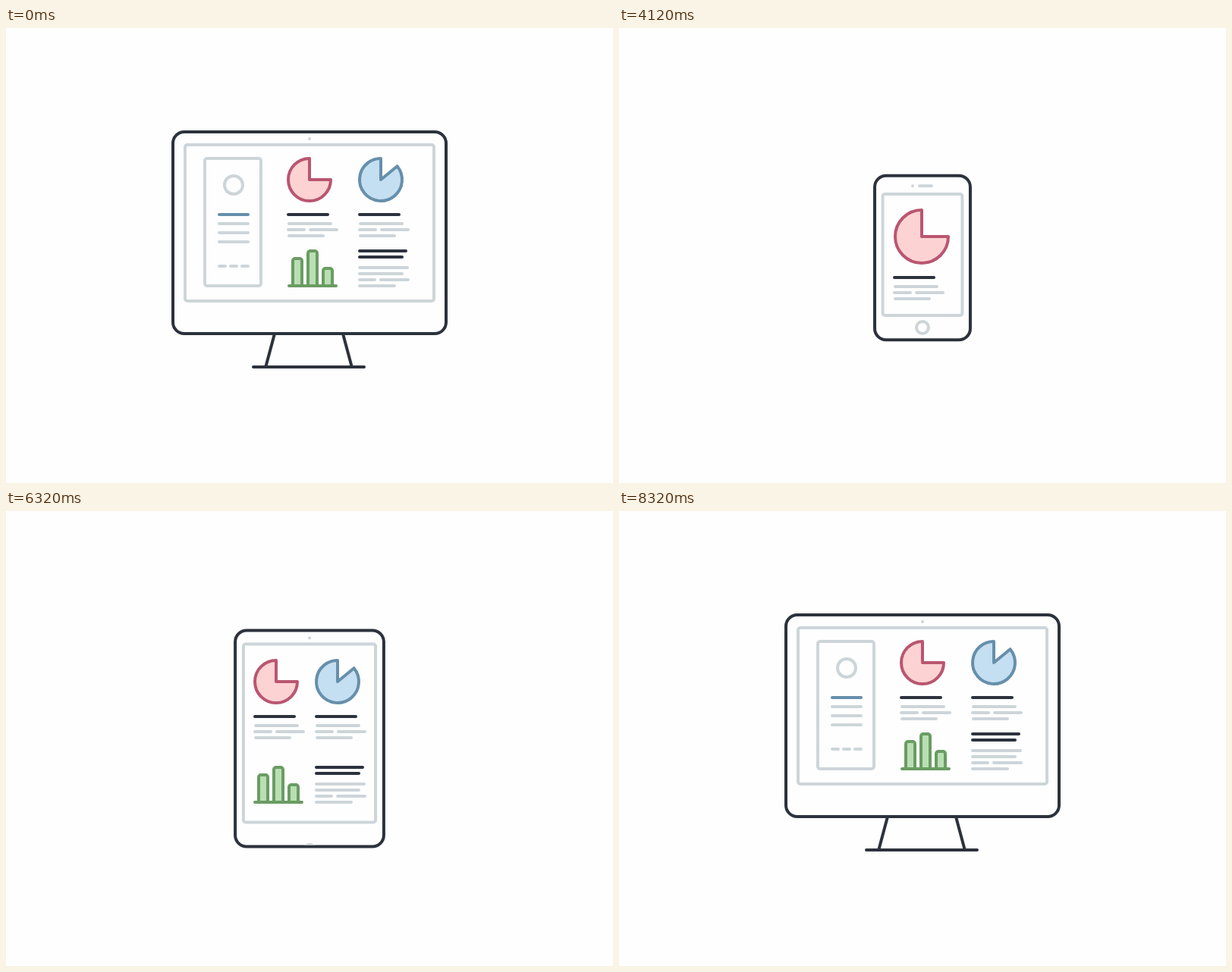
An HTML page with a canvas that plays this animation: 800 by 600 pixels, repeating every 9240 ms.

```html
<!DOCTYPE html>
<html lang="en">
<head>
<meta charset="utf-8">
<title>Responsive dashboard</title>
<style>
html, body { margin: 0; width: 100%; height: 100%; overflow: hidden; background: #fefefe; }
canvas { display: block; width: 800px; height: 600px; }
</style>
</head>
<body>
<canvas id="stage" width="800" height="600"></canvas>
<script>
const ctx = document.getElementById('stage').getContext('2d');
const LOOP = 9240, STEP = 40, BLANK = 160;
const WHITE = '#fefefe', DARK = '#2c323d', GREY = '#cdd5d9';
const PINK = ['#b95670', '#fdd2d3'], BLUE = ['#668fab', '#c4dff1'], GREEN = ['#6a9c63', '#b9dfb3'];
const WATCH = 0, PHONE = 1, TABLET = 2, DESKTOP = 3;
const STARTS = [400, 2880, 4080, 6240];

// Rectangles are x, y, w, h; pies are cx, cy, r
const DEVICES = [
  { body: [349, 242, 100, 114], screen: [362, 260, 74, 80], pie: [400, 294, 18], head: [380, 324, 40] },
  { body: [336, 193, 128, 220], screen: [347, 218, 106, 162], pie: [399, 275, 35], head: [361, 329, 56],
    cam: [387, 13.5], home: [395] },
  { body: [299, 153, 202, 294], screen: [311, 173, 178, 240], pie: [356, 225, 28], head: [326, 271, 56],
    cam: [400, 10], home: [430], pie2: [437, 225, 28], text2: [407, 271], bars: [326, 384], text3: [407, 338] },
  { body: [220, 137, 360, 266], screen: [236, 154, 328, 206], pie: [400, 200, 28], head: [370, 246, 56],
    cam: [400, 9], pie2: [494, 200, 28], text2: [464, 246], bars: [371, 340], text3: [464, 294] }
];

// Text rows: x0, x1, y, dark
const DETAILS = [[1, 60, 12], [0, 25, 20], [29, 68, 20], [1, 50, 28]];
const SUMMARY = [[0, 56, 0, 1], ...DETAILS];
const ARTICLE = [[0, 65, 0, 1], [0, 60, 8, 1], [0, 67, 22], [0, 60, 30], [0, 24, 38], [28, 68, 38], [0, 50, 46]];
const BARS = [[7, 36], [27, 46], [47, 23]];

const clamp = v => Math.max(0, Math.min(1, v));
const ease = v => v < .5 ? 4 * v ** 3 : 1 - (2 - 2 * v) ** 3 / 2;
const quad = v => v < .5 ? 2 * v * v : 1 - 2 * (1 - v) ** 2;
const out = v => 1 - (1 - v) ** 3;
const ramp = (u, start, dur) => clamp((u - start) / dur);

function stroke(color, width = 4) {
  ctx.strokeStyle = color;
  ctx.lineWidth = width;
  ctx.stroke();
}

function dot(x, y, r, color) {
  if (r <= 0) return;
  ctx.beginPath();
  ctx.arc(x, y, r, 0, 7);
  ctx.fillStyle = color;
  ctx.fill();
}

function segment(x0, y0, x1, y1, color, p = 1) {
  if (p <= 0) return;
  ctx.beginPath();
  ctx.moveTo(x0, y0);
  ctx.lineTo(x0 + (x1 - x0) * p, y0 + (y1 - y0) * p);
  stroke(color);
}

const bar = (x0, x1, y, color, p = 1) => segment(x0 + 2, y, x1 - 2, y, color, p);

// Strokes the part of a rounded rectangle between a and b, clockwise from top centre
function frame([x, y, w, h], r, color, a = 0, b = 1) {
  if (b <= a) return;
  const cx = x + w / 2, length = 2 * (w + h) - (8 - 2 * Math.PI) * r;
  ctx.beginPath();
  ctx.moveTo(cx, y);
  ctx.arcTo(x + w, y, x + w, y + h, r);
  ctx.arcTo(x + w, y + h, x, y + h, r);
  ctx.arcTo(x, y + h, x, y, r);
  ctx.arcTo(x, y, cx, y, r);
  ctx.closePath();
  if (a > 0 || b < 1) {
    ctx.setLineDash([(b - a) * length, length * 2]);
    ctx.lineDashOffset = -a * length;
  }
  stroke(color);
  ctx.setLineDash([]);
}

// Draws a frame on, with a faded leading end
function drawOn(rect, r, color, progress, u) {
  const tail = progress(u - STEP), n = 6;
  frame(rect, r, color, 0, tail);
  ctx.lineCap = 'butt';
  for (let k = 0; k < n; k++) {
    ctx.globalAlpha = 1 - (k + .5) / n;
    frame(rect, r, color, progress(u - STEP + k * STEP / n), progress(u - STEP + (k + 1) * STEP / n));
  }
  ctx.globalAlpha = 1;
  ctx.lineCap = 'round';
}

function pie([x, y, r], from, [line, fill], p = 1) {
  if (p <= 0) return;
  ctx.beginPath();
  ctx.moveTo(x, y);
  ctx.arc(x, y, r * p, from, Math.PI * 1.5);
  ctx.closePath();
  ctx.fillStyle = fill;
  ctx.fill();
  stroke(line);
}

function text(rows, [x, y], p = 1) {
  rows.forEach(([x0, x1, dy, dark], i) =>
    bar(x + x0, x + x1, y + dy, dark ? DARK : GREY, ease(clamp((p * (rows.length + 2) - i) / 3))));
}

function chart([x, y], base, grow) {
  BARS.forEach(([dx, full], i) => {
    const h = full * out(clamp(grow * 1.6 - i * .3));
    if (h < 1) return;
    ctx.beginPath();
    ctx.moveTo(x + dx, y);
    ctx.arcTo(x + dx, y - h, x + dx + 6, y - h, Math.min(3, h));
    ctx.arcTo(x + dx + 12, y - h, x + dx + 12, y, Math.min(3, h));
    ctx.lineTo(x + dx + 12, y);
    ctx.fillStyle = GREEN[1];
    ctx.fill();
    stroke(GREEN[0]);
  });
  bar(x, x + 66, y, GREEN[0], base);
}

function ring(x, y, r, p = 1) {
  if (p <= 0) return;
  ctx.beginPath();
  ctx.arc(x, y, r, -Math.PI / 2, -Math.PI / 2 + p * 2 * Math.PI);
  stroke(GREY);
}

function scaled([x, y, w, h], s, grow = 0) {
  const dx = w * (1 - s) / 2 - grow, dy = h * (1 - s) / 2 - grow;
  return [x + dx, y + dy, w - 2 * dx, h - 2 * dy];
}

function crown(x) {
  if (x <= 449) return;
  ctx.fillStyle = WHITE;
  ctx.fillRect(446, 271, x - 446, 14);
  ctx.beginPath();
  ctx.moveTo(449, 270);
  ctx.arcTo(x, 270, x, 278, 2);
  ctx.arcTo(x, 286, 449, 286, 2);
  ctx.lineTo(449, 286);
  stroke(DARK);
}

function intro(u) {
  const fall = ramp(u, 0, 360);
  if (fall < 1) dot(400, 2 + 297 * fall * fall, 4, DARK);
  const burst = ramp(u, 360, 740);
  if (burst > 0 && burst < 1) {
    const colors = [PINK[0], BLUE[0], GREEN[0], GREY];
    for (let i = 0; i < 8; i++) {
      const a = i * Math.PI / 4, d = 148 * out(burst);
      dot(400 + d * Math.cos(a), 300 + d * Math.sin(a), 4 * (1 - burst), colors[i % 4]);
    }
  }
  const watch = DEVICES[WATCH], [x, y, w] = watch.head;
  drawOn(watch.body, 15, DARK, v => ease(ramp(v, 440, 540)), u);
  crown(449 + 4 * out(ramp(u, 980, 160)));
  frame(watch.screen, 3, GREY, 0, ease(ramp(u, 800, 480)));
  pie(watch.pie, 0, PINK, out(ramp(u, 1200, 400)));
  bar(x, x + w, y, DARK, ease(ramp(u, 1540, 340)));
}

function stand(u) {
  segment(444.5, 405, 455.5, 446, DARK, ramp(u, 520, 120));
  segment(472, 447, 326, 447, DARK, quad(ramp(u, 620, 160)));
  segment(342.5, 446, 353.5, 405, DARK, ramp(u, 800, 140));
}

function sidebar(u) {
  frame([262, 172, 74, 168], 3, GREY, 0, quad(ramp(u, 640, 410)));
  ring(300, 207, 12, ease(ramp(u, 1060, 300)));
  for (let i = 0; i < 4; i++)
    bar(279, 321, 246 + 12 * i, i ? GREY : BLUE[0], ease(ramp(u, 1280 + 110 * i, 220)));
  for (let i = 0; i < 3; i++)
    bar(279 + 15 * i, 291 + 15 * i, 314, GREY, ease(ramp(u, 1720 + 80 * i, 180)));
}

function morph(stage, u) {
  const from = DEVICES[stage - 1], to = DEVICES[stage];
  const k = ease(ramp(u, 160, 300));
  const squeeze = .052 * Math.sin(Math.PI / 2 * clamp(u / 200)) * (1 - k);
  const mix = key => {
    const b = to[key], a = from[key] || b;
    return b.map((v, i) => a[i] + (v - a[i]) * k);
  };
  const since = (device, start, dur) => stage > device ? 1 : stage < device ? 0 : ramp(u, start, dur);

  const settle = stage === DESKTOP
    ? Math.cos((u - 400) / 111) * ramp(u, 160, 240) * (1 - ramp(u, 400, 900)) : 0;
  const body = scaled(mix('body'), 1 - squeeze, settle);
  const screen = scaled(mix('screen'), 1 - squeeze * .7, settle);
  const bottom = body[1] + body[3];

  if (stage === DESKTOP) stand(u);
  frame(body, 15, DARK, ease(ramp(u, 120, 220)), u < 340 ? 1 : 0);
  drawOn(body, 15, DARK, v => ease(ramp(v, 294, 480)), u);
  if (stage === PHONE) crown(453 - 6 * ramp(u, 0, 120));
  frame(screen, 3, GREY);

  const [camX, camY] = mix('cam');
  dot(camX, body[1] + camY, 2 * since(PHONE, 480, 120), GREY);
  if (stage < DESKTOP) {
    const speaker = stage === PHONE ? ease(ramp(u, 560, 200)) : 1 - ramp(u, 120, 140);
    bar(394, 414, body[1] + camY, GREY, speaker);
    ring(400, mix('home')[0], 8, since(PHONE, 520, 260));
  } else if (u < 120) {
    ctx.save();
    ctx.beginPath();
    ctx.rect(body[0], body[1], body[2], body[3] - 2);
    ctx.clip();
    ring(400, Math.min(430 + 18 * u / 80, bottom + 12), 8);
    ctx.restore();
  }

  const [x, y, w] = mix('head');
  pie(mix('pie'), 0, PINK);
  bar(x, x + w, y, DARK);
  text(DETAILS, [x, y], since(PHONE, 620, 500));

  if (stage >= TABLET) {
    pie(mix('pie2'), -.69, BLUE, out(since(TABLET, 636, 360)));
    text(SUMMARY, mix('text2'), since(TABLET, 900, 560));
    chart(mix('bars'), ease(since(TABLET, 600, 320)), since(TABLET, 880, 480));
    text(ARTICLE, mix('text3'), since(TABLET, 1300, 740));
  }
  if (stage === DESKTOP) sidebar(u);
}

function draw(now) {
  let t = Math.floor(now % LOOP / STEP) * STEP;
  ctx.fillStyle = WHITE;
  ctx.fillRect(0, 0, 800, 600);
  ctx.lineCap = ctx.lineJoin = 'round';
  if (t < BLANK) t += LOOP;
  const stage = STARTS.filter(s => s <= t).length - 1;
  if (stage === WATCH) intro(t - STARTS[WATCH]);
  else if (stage > WATCH) morph(stage, t - STARTS[stage]);
}

const begin = performance.now();
function tick() {
  draw(performance.now() - begin);
  requestAnimationFrame(tick);
}
tick();
</script>
</body>
</html>
```
